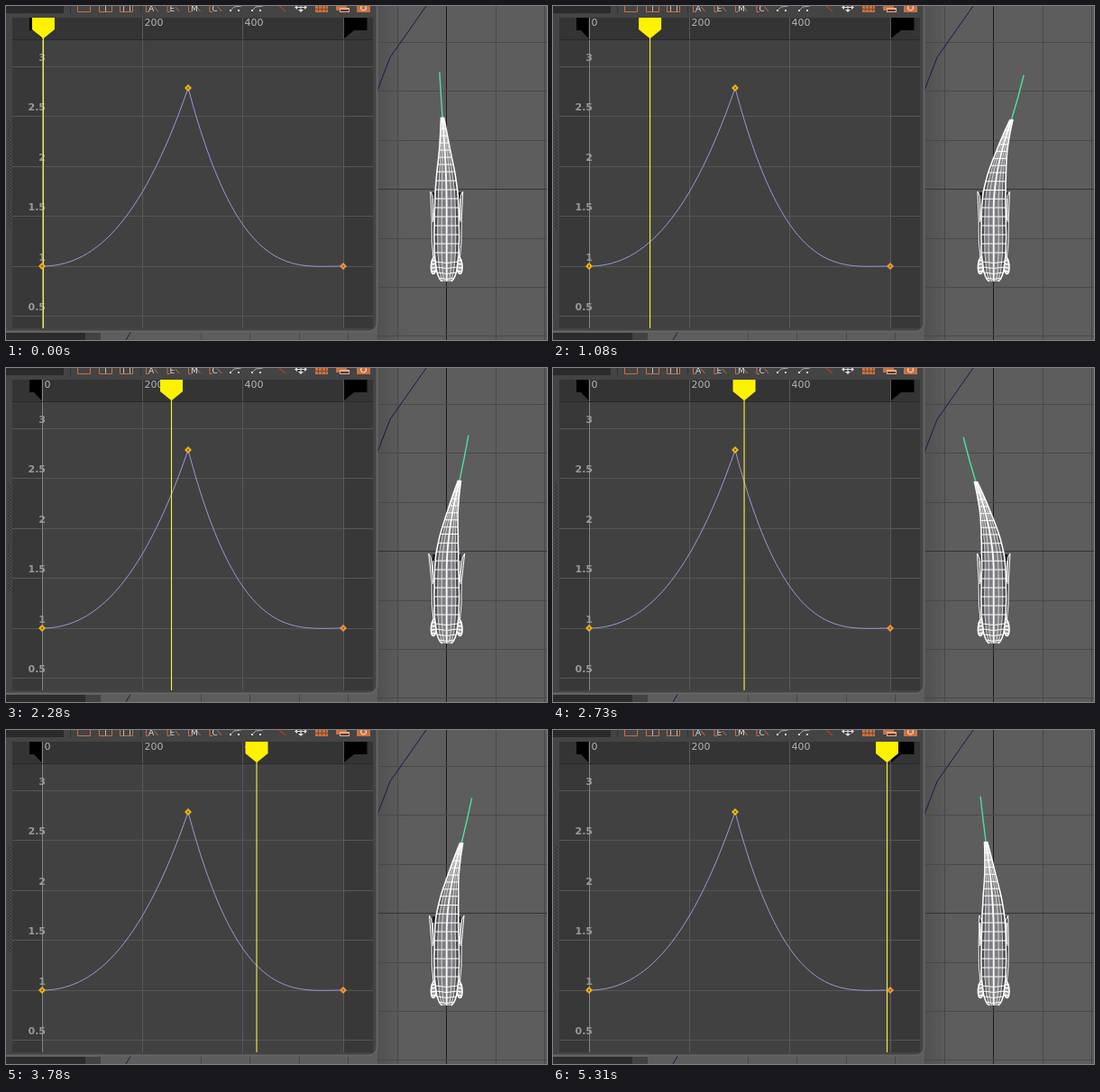
Write an HTML page with a canvas that moves like this. It is 600x371 px and loops after 5340 ms.

```html
<!DOCTYPE html>
<html lang="en">
<head>
<meta charset="utf-8">
<title>Tail swim speed curve</title>
<style>
html, body { margin: 0; width: 100%; height: 100%; overflow: hidden; background: #5c5c5c; }
canvas { display: block; }
</style>
</head>
<body>
<canvas id="stage" width="600" height="371"></canvas>
<script>
const ctx = document.getElementById('stage').getContext('2d');
const LOOP = 5340, STEP = 30;
const X0 = 40, XPEAK = 202, X1 = 374, YBASE = 289, RISE = 198;
const UNIT = 111; // pixels per 1.0 of curve value
const MID = 488.7; // fish axis

// time, playhead x, tail phase, fin spread
const keys = [
  [0, 41.4, 3.375, 18], [540, 73.4, 8.353, 16.3], [1620, 141.8, 20.92, 19.3],
  [2280, 183.5, 32.206, 20], [3180, 240.6, 50.415, 16.5],
  [3780, 278, 58.73, 19.3], [5310, 370.5, 72.7, 16]
];

// Area under the speed curve from its start to x: the travelled swim phase
function area(x) {
  const u = Math.min(1, Math.max(0, (x - X0) / (XPEAK - X0)));
  const w = Math.min(1, (X1 - x) / (X1 - XPEAK));
  const up = 0.21 * u ** 3 + 0.0925 * u ** 4;
  const down = 0.22875 - 0.31375 * w ** 4 + 0.085 * w ** 3;
  return x - X0 + RISE / UNIT * ((XPEAK - X0) * up + (X1 - XPEAK) * down);
}

const mix = (a, b, p) => a + (b - a) * p;

function stateAt(t) {
  let i = 0;
  while (i < keys.length - 2 && t >= keys[i + 1][0]) i++;
  const a = keys[i], b = keys[i + 1];
  const p = Math.min(1, (t - a[0]) / (b[0] - a[0]));
  const x = mix(a[1], b[1], p);
  const q = (area(x) - area(a[1])) / (area(b[1]) - area(a[1]));
  return { x, swing: 34 * Math.sin(mix(a[2], b[2], q)), fin: mix(a[3], b[3], p) };
}

function box(x, y, w, h, color) {
  ctx.fillStyle = color;
  ctx.fillRect(x, y, w, h);
}

function trace(pts) {
  ctx.beginPath();
  pts.forEach(([x, y]) => ctx.lineTo(x, y));
}

function line(pts, color, width = 1) {
  trace(pts);
  ctx.strokeStyle = color;
  ctx.lineWidth = width;
  ctx.stroke();
}

function shape(pts, color) {
  trace(pts);
  ctx.fillStyle = color;
  ctx.fill();
}

function label(text, x, y, color, font, align = 'left') {
  ctx.font = font + ' "DejaVu Sans", sans-serif';
  ctx.textAlign = align;
  ctx.fillStyle = color;
  ctx.fillText(text, x, y);
}

function drawViewport() {
  box(0, 0, 600, 371, '#5d5d5d');
  const shade = ctx.createLinearGradient(412, 0, 440, 0);
  shade.addColorStop(0, '#0002');
  shade.addColorStop(1, '#0000');
  box(412, 0, 28, 371, shade);
  for (let i = 0; i < 8; i++) {
    const x = Math.floor(216 + i * 54.5) + 0.5;
    line([[x, 0], [x, 371]], i === 5 ? '#1c1c1c' : '#484848');
  }
  for (let i = 0; i < 7; i++) {
    const y = Math.floor(40.4 + i * 54.4) + 0.5;
    line([[411, y], [600, y]], i === 3 ? '#333' : '#484848');
  }
  line([[411, 96], [426, 57], [466, 0]], '#17174f');
  line([[133, 371], [139, 361]], '#17174f');
}

function drawToolbar() {
  const orange = '#c9713f';
  box(0, 0, 64, 8, '#2a2a2a');
  for (const x of [71.5, 149.5]) line([[x, 0], [x, 8]], '#303030');
  for (const x of [79.5, 103.5, 126.5]) line([[x, 0], [x, 6.5], [x + 14, 6.5], [x + 14, 0]], orange);
  for (const x of [110.5, 130.5, 137.5]) line([[x, 0], [x, 6]], '#bbb');
  ['A', 'E', 'M', 'C'].forEach((c, i) => {
    const x = 155.5 + i * 23.5;
    line([[x, 0], [x, 6.5], [x + 3, 6.5]], orange);
    line([[x + 9, 1], [x + 13, 6]], orange);
    label(c, x + 2.5, 6, '#ddd', '9px');
  });
  for (const x of [249, 273]) {
    line([[x, 5], [x + 4, 1], [x + 12, 0]], '#aaa');
    box(x - 1, 4, 2, 2, '#ddd');
    box(x + 8, 4, 2, 2, '#ddd');
  }
  line([[303, 0], [310, 6]], '#a0432c', 1.5);
  line([[321, 1.5], [333, 1.5]], '#ddd');
  line([[327, 0], [327, 6]], '#ddd');
  shape([[324, 4], [330, 4], [327, 7]], '#ddd');
  shape([[323, -1], [323, 4], [320, 1.5]], '#ddd');
  shape([[331, -1], [331, 4], [334, 1.5]], '#ddd');
  box(343, 0, 14, 7, orange);
  for (const x of [346.5, 350.5, 354.5]) line([[x, 0], [x, 6]], '#7a4a30');
  line([[343, 3.5], [357, 3.5]], '#7a4a30');
  box(366, 0, 12, 5, orange);
  box(370, 2, 11, 5, '#ddb090');
  box(371, 4, 9, 2, '#633');
  box(389, 0, 15, 7, orange);
  ctx.beginPath();
  ctx.arc(396.5, 2, 3, 0, 7);
  ctx.strokeStyle = '#eee';
  ctx.stroke();
}

function diamond(x, y, edge, core) {
  const ring = r => [[x, y - r], [x + r, y], [x, y + r], [x - r, y]];
  shape(ring(4), edge);
  shape(ring(1.4), core);
}

function drawGraph(x) {
  box(0, 363, 88, 8, '#2b2b2b');
  box(88, 363, 17, 8, '#424242');
  ctx.beginPath();
  ctx.roundRect(-10, -10, 422, 372, 9);
  ctx.fillStyle = '#444';
  ctx.fill();
  line([[0, 0]], '#0000');
  ctx.beginPath();
  ctx.roundRect(-10, -10, 421.5, 371.5, 9);
  ctx.strokeStyle = '#656565';
  ctx.lineWidth = 2;
  ctx.stroke();
  for (let y = 128; y < 245; y += 4) {
    box(2, y, 1, 1, '#222');
    box(4, y + 2, 1, 1, '#222');
  }
  drawToolbar();

  box(7, 13, 400, 345, '#383838');
  box(X0, 37, X1 - X0, 321, '#414141');
  box(7, 13, 400, 24, '#343434');
  const values = [0.5, 1, 1.5, 2, 2.5, 3];
  for (const v of values) {
    const y = Math.floor(YBASE - (v - 1) * UNIT) + 0.5;
    line([[7, y], [407, y]], '#565656');
  }
  for (const gx of [151.5, 262.5, 374.5]) line([[gx, 13], [gx, 358]], '#5a5a5a');
  line([[40.5, 13], [40.5, 358]], '#858585');
  line([[7, 37.5], [407, 37.5]], '#292929');
  for (const v of values)
    label(v, 44, Math.floor(YBASE - (v - 1) * UNIT) - 6, '#999', 'bold 11px', 'right');
  [0, 200, 400].forEach((n, i) => label(n, 42.5 + i * 111, 22, '#b5b5b5', '11px'));
  shape([[26, 13], [39.5, 13], [39.5, 36], [31, 27], [26, 27]], '#000');
  shape([[375, 13], [400.5, 13], [400.5, 27], [386, 27], [375, 36]], '#000');

  ctx.beginPath();
  ctx.moveTo(X0, YBASE);
  ctx.bezierCurveTo(94, YBASE, 148, 247.4, XPEAK, YBASE - RISE);
  ctx.bezierCurveTo(259.3, 305.8, 316.7, YBASE, X1, YBASE);
  ctx.strokeStyle = '#9d98d8';
  ctx.stroke();

  line([[x, 36], [x, 358]], '#fff536', 1.1);
  shape([[x - 12.5, 13], [x + 12.5, 13], [x + 12.5, 26], [x, 36.3], [x - 12.5, 26]], '#fff200');
  diamond(X0, YBASE, '#f0b414', '#7a5a10');
  diamond(XPEAK, YBASE - RISE, '#f0b414', '#7a5a10');
  diamond(X1, YBASE, '#f0963a', '#a06020');
}

// Half width of the fish along its length, as [y, width]
const profile = [[123.5, 1.5], [140, 3.5], [160, 6], [185, 10], [207, 12.5], [230, 13.5],
  [255, 14], [275, 13.5], [295, 11], [303, 8], [308, 3]];

function halfWidth(y) {
  const i = Math.max(1, profile.findIndex(p => p[0] >= y));
  const [ya, wa] = profile[i - 1], [yb, wb] = profile[i];
  return mix(wa, wb, (y - ya) / (yb - ya));
}

function drawSide(side, fin) {
  const at = pts => pts.map(([d, y]) => [MID + side * d, y]);
  // Dark gap between the body and the folded fin
  shape(at([[12, 207], [15.5, 207], [16.5, 240], [15, 276], [12, 276]]), '#161616');
  line(at([[14.5, 282], [16.3, 262], [16.5, 238], [fin, 206], [fin - 2.5, 211], [14.5, 238]]), '#fff');
  line(at([[15, 214], [15.5, 240]]), '#fff');
  ctx.beginPath();
  ctx.ellipse(MID + side * 14, 288, 3.2, 9.5, side * -0.1, 0, 7);
  ctx.fillStyle = '#9a9a9a';
  ctx.fill();
  ctx.strokeStyle = '#fff';
  ctx.lineWidth = 1.6;
  ctx.stroke();
  for (let y = 282; y < 297; y += 4) line(at([[9, y], [17, y + 1]]), '#fff', 1.3);
}

function drawFish({ swing, fin }) {
  const tipY = 73 + 3 * (swing / 30) ** 2;
  const bend = y => 0.6 * swing * Math.max(0, (225 - y) / 102) ** 1.8;
  const drop = y => 2 * (swing / 30) ** 2 * Math.max(0, (225 - y) / 102);
  const at = (y, side) => [MID + bend(y) + side * halfWidth(y), y + drop(y)];
  const rows = [];
  for (let y = 123.5; y <= 308; y += 2.5) rows.push(y);
  const strip = side => rows.map(y => at(y, side));
  const band = (side, color) => shape([...strip(-side), ...strip(side).reverse()], color);

  const root = at(123.5, 0);
  ctx.beginPath();
  ctx.moveTo(...root);
  ctx.quadraticCurveTo(mix(root[0], MID + swing, 0.55), mix(root[1], tipY, 0.5), MID + swing, tipY);
  ctx.strokeStyle = '#4fe0a0';
  ctx.lineWidth = 1.4;
  ctx.stroke();

  for (const side of [-1, 1]) drawSide(side, fin);
  band(1, '#4c4c4e');
  band(0.75, '#7e7e82');
  for (const s of [-1, -0.72, -0.4, 0.4, 0.72, 1])
    line(strip(s), '#fff', Math.abs(s) === 1 ? 1.6 : 0.7);
  line(strip(0), '#fff', 1.8);
  for (let y = 128; y < 306; y += y < 180 ? 8 : y < 275 ? 10 : 6) {
    const [cx, cy] = at(y, 0);
    ctx.beginPath();
    ctx.moveTo(...at(y, -1));
    ctx.quadraticCurveTo(cx, cy + (y > 275 ? 3 : 0), ...at(y, 1));
    ctx.strokeStyle = '#fff';
    ctx.lineWidth = 1;
    ctx.stroke();
  }
}

function frame(now) {
  const t = Math.floor((now % LOOP) / STEP) * STEP;
  const state = stateAt(t);
  drawViewport();
  drawFish(state);
  drawGraph(state.x);
  requestAnimationFrame(frame);
}

ctx.lineJoin = 'round';
frame(0);
</script>
</body>
</html>
```
